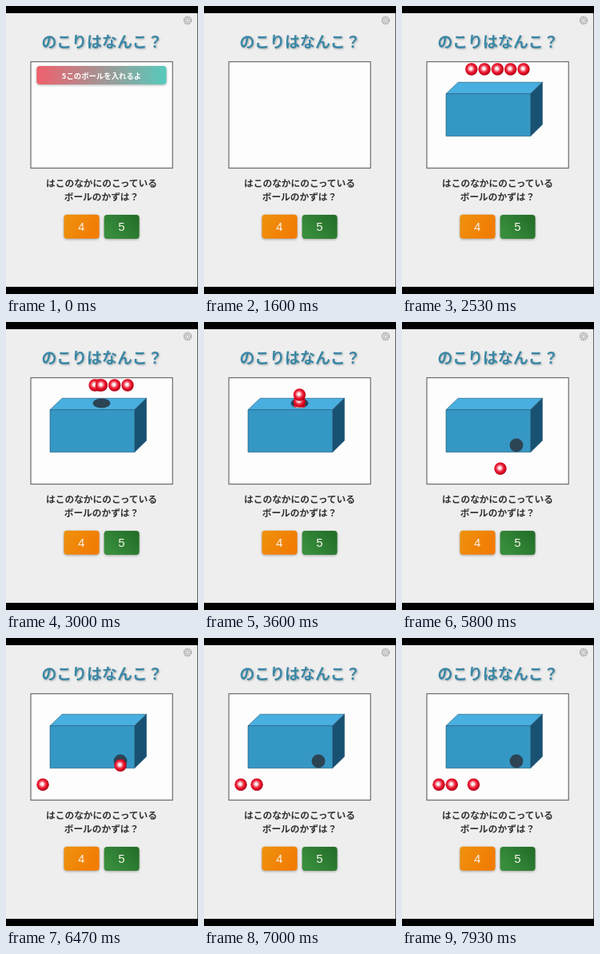
An HTML page for the animation above (8 s loop, 240 px wide and 360 px high).

```html
<!DOCTYPE html>
<html lang="ja">
<head>
<meta charset="utf-8">
<title>のこりはなんこ？</title>
<style>
  html, body { margin: 0; width: 100%; height: 100%; overflow: hidden; background: #000; }
  svg { display: block; width: 100vw; height: 100vh; }
  text { font-family: "Noto Sans CJK JP", "Noto Sans CJK", "Noto Sans", sans-serif; font-weight: 700; text-anchor: middle; }
  .digit { font-family: "Liberation Sans", sans-serif; font-weight: 400; font-size: 15px; fill: #f8f4ea; }
  .title { font-size: 18.9px; fill: #3a87a5; filter: drop-shadow(1px 1px 1px rgba(0,0,0,.26)); }
  .question { font-size: 11.7px; fill: #333; }
  .raised { filter: drop-shadow(0 1.5px 1.5px rgba(0,0,0,.32)); }
  .box { stroke: #235672; stroke-width: .6; stroke-linejoin: round; }
</style>
</head>
<body>
<svg viewBox="0 0 240 360">
  <defs>
    <linearGradient id="bannerFill"><stop stop-color="#f0606d"/><stop offset="1" stop-color="#56cabc"/></linearGradient>
    <linearGradient id="orange" x2="1" y2=".4"><stop stop-color="#ee920e"/><stop offset="1" stop-color="#f27c04"/></linearGradient>
    <linearGradient id="green" y1=".6" x2="1" y2="0"><stop stop-color="#388e3c"/><stop offset="1" stop-color="#216b27"/></linearGradient>
    <radialGradient id="red" cx=".45" cy=".45" r=".56">
      <stop stop-color="#fff"/><stop offset=".2" stop-color="#fbdfe2"/>
      <stop offset=".5" stop-color="#ee3349"/><stop offset=".75" stop-color="#e0061f"/>
      <stop offset="1" stop-color="#a00216"/>
    </radialGradient>
    <clipPath id="aboveHole"><path d="M30 70H208V101.5H130.5A11 6 0 0 1 108.5 101.5H30Z"/></clipPath>
  </defs>

  <rect y="9" width="239.4" height="342" fill="#eee"/>
  <g fill="none" stroke="#a6a6a6" stroke-width=".8">
    <circle cx="227" cy="18" r="4.7" stroke-dasharray="2.3 .65" stroke-width="1.1"/>
    <circle cx="227" cy="18" r="3.5"/>
    <circle cx="227" cy="18" r="1.8"/>
  </g>
  <text class="title" x="120" y="52">のこりはなんこ？</text>
  <rect x="31" y="69.7" width="177.2" height="133" fill="#fdfdfd" stroke="#505050"/>

  <g id="banner">
    <rect class="raised" x="38.3" y="75" width="162.2" height="23" rx="4" fill="url(#bannerFill)"/>
    <text x="119.5" y="90.6" font-size="9.4" fill="#fff">5このボールを入れるよ</text>
  </g>

  <g id="scene">
    <g class="box">
      <path d="M55 109.7L70.2 95.3H175.5L160.7 109.7Z" fill="#49afe0"/>
      <path d="M160.7 109.7L175.5 95.3V148.2L160.7 162.7Z" fill="#195172"/>
      <path d="M55 109.7H160.7V162.7H55Z" fill="#3597c4"/>
    </g>
    <ellipse id="topHole" cx="119.5" cy="101.5" rx="11" ry="6" fill="#2c4454"/>
    <circle id="frontHole" cx="143" cy="154" r="8.4" fill="#2c4454"/>
    <g id="inBalls" clip-path="url(#aboveHole)"></g>
    <g id="outBalls"></g>
  </g>

  <text class="question" x="119.5" y="226">はこのなかにのこっている</text>
  <text class="question" x="119.5" y="242.8">ボールのかずは？</text>
  <rect class="raised" x="72.4" y="260.7" width="44.2" height="30" rx="4" fill="url(#orange)"/>
  <rect class="raised" x="122.6" y="260.9" width="44" height="30" rx="4" fill="url(#green)"/>
  <text class="digit" x="94.2" y="281">4</text>
  <text class="digit" x="144.4" y="281">5</text>
</svg>
<script>
const LOOP = 8000, GAP = 16.3, CENTER = 119.4;
const TOP_Y = 79, FLOOR_Y = 183.3, EXIT = { x: 143, y: 154 };
const el = id => document.getElementById(id);
const mix = (a, b, p) => a + (b - a) * p;
const span = (t, start, length) => Math.min(1, Math.max(0, (t - start) / length));
const easeInOut = p => p * p * (3 - 2 * p);

// cubic-bezier(.25, .1, .25, 1), solved by bisection
function ease(p) {
  let lo = 0, hi = 1;
  for (let i = 0; i < 20; i++) {
    const s = (lo + hi) / 2, r = 1 - s;
    if (.75 * s * r * r + .75 * s * s * r + s ** 3 < p) lo = s; else hi = s;
  }
  return .3 * lo * (1 - lo) ** 2 + 3 * lo * lo * (1 - lo) + lo ** 3;
}

function makeBalls(parent, count) {
  return Array.from({ length: count }, () => {
    const ball = document.createElementNS("http://www.w3.org/2000/svg", "circle");
    ball.setAttribute("r", 7.7);
    ball.setAttribute("fill", "url(#red)");
    return el(parent).appendChild(ball);
  });
}

function show(node, visible) {
  node.style.display = visible ? "" : "none";
}

function place(ball, x, y) {
  ball.setAttribute("cx", x);
  ball.setAttribute("cy", y);
}

const inBalls = makeBalls("inBalls", 5);
const outBalls = makeBalls("outBalls", 3);

function draw(t) {
  el("banner").style.opacity = 1 - span(t, 1200, 380);
  show(el("scene"), t >= 1670);
  el("topHole").style.opacity = t < 4070 ? span(t, 2540, 230) : 0;
  el("frontHole").style.opacity = span(t, 5000, 370);

  inBalls.forEach((ball, i) => {
    const start = 2753 + i * 100;
    const slide = easeInOut(span(t, start, 300));
    const fall = span(t, start + 300, 370);
    place(ball, mix(CENTER + (i - 2) * GAP, CENTER, slide), mix(TOP_Y, TOP_Y + 30, fall));
    show(ball, fall < 1);
  });

  outBalls.forEach((ball, i) => {
    const start = 5370 + i * 1000;
    const drop = easeInOut(span(t, start, 375));
    const roll = ease(span(t, start + 375, 350));
    place(ball, mix(EXIT.x, 46 + i * GAP, roll), mix(EXIT.y, FLOOR_Y, drop));
    show(ball, t >= start);
  });
}

const began = performance.now();
function tick() {
  draw((performance.now() - began) % LOOP);
  requestAnimationFrame(tick);
}
tick();
</script>
</body>
</html>
```
